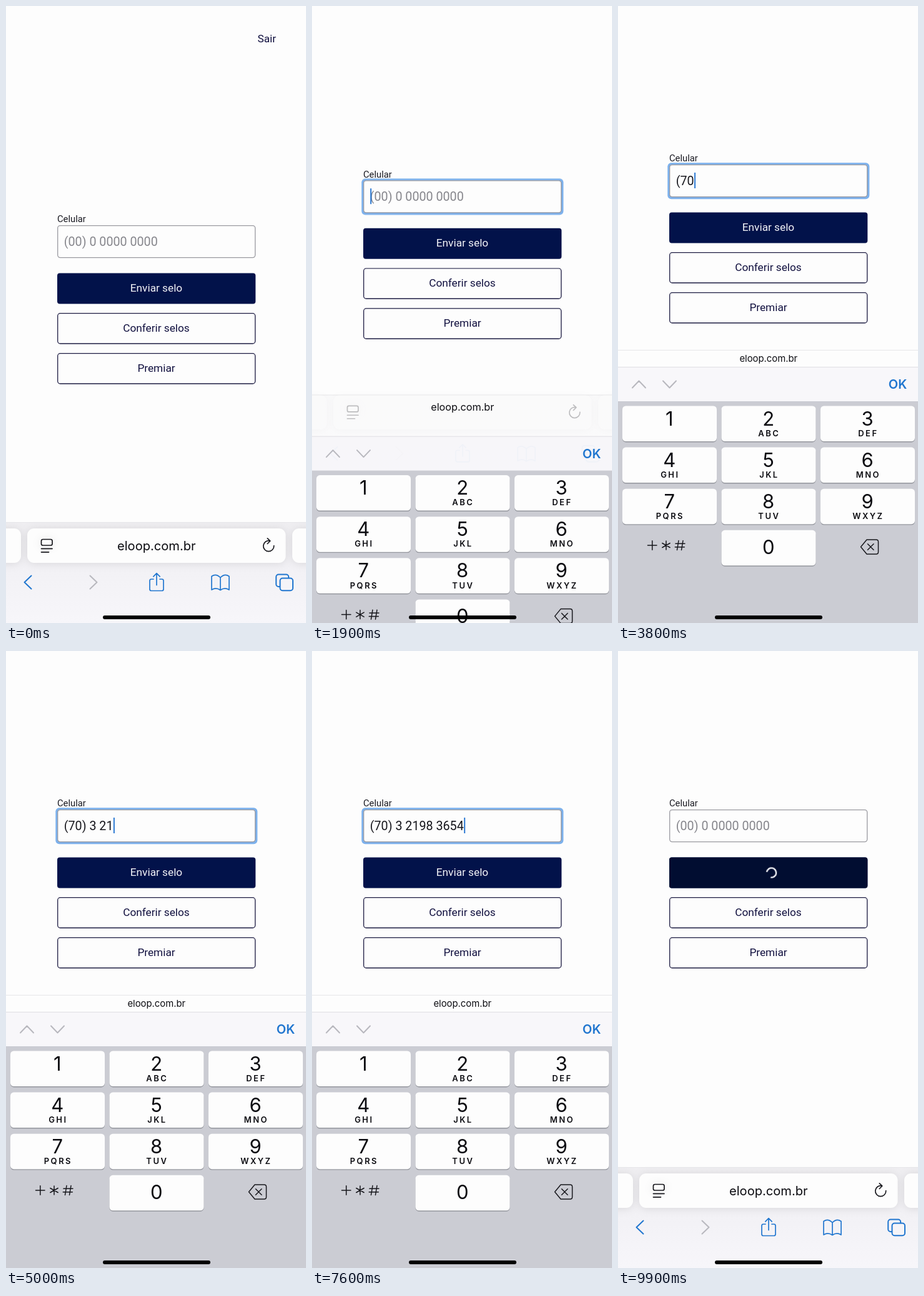
Recreate the animation shown at these times as an HTML page. Size 480 px wide and 985 px high, loop 10000 ms.

```html
<!DOCTYPE html>
<html lang="pt-BR">
<head>
<meta charset="utf-8">
<title>Enviar selo</title>
<style>
  @property --k { syntax: "<number>"; inherits: true; initial-value: 0; } /* keyboard openness */
  @property --s { syntax: "<number>"; inherits: true; initial-value: 0; } /* page scroll */

  html, body { margin: 0; width: 100%; height: 100%; overflow: hidden; background: #fdfdfd; }
  svg {
    display: block; width: 100vw; height: 100vh;
    animation: keyboard 10s infinite, scroll 10s infinite;
    animation-timing-function: cubic-bezier(.38, .7, .125, 1);
  }
  @keyframes keyboard { 0%, 17.5% { --k: 0 } 22.5%, 84.17% { --k: 1 } 89.17%, 100% { --k: 0 } }
  @keyframes scroll { 0%, 17.5% { --s: 0 } 22.5%, 100% { --s: 1 } }

  text { font-family: Inter, sans-serif; fill: #0b0b10; }
  .mid text, text.mid { text-anchor: middle; }
  .line { fill: none; stroke-width: 2; stroke-linecap: round; stroke-linejoin: round; }
  .blue { stroke: #2076cf; }
  .grey { stroke: #b8b8be; }
  .dark { stroke: #17171c; stroke-width: 1.7; }

  #page { transform: translateY(calc(var(--s) * -97px)); }
  #page text { font-family: Roboto, sans-serif; font-size: 17.23px; fill: #11103f; }
  #page .label { font-size: 14.77px; fill: #1a1a22; }
  #page .field { font-size: 19.7px; fill: #16161c; }
  #page #hint { fill: #85858b; }
  #page .light { fill: #f4f4f8; }
  .box { fill: #fdfdfd; stroke: #1d1c42; stroke-width: 1.3; }

  .ring { animation: focus 10s step-end infinite; }
  @keyframes focus { 0% { opacity: 0 } 17.3% { opacity: 1 } 82.5%, 100% { opacity: 0 } }
  .loading { animation: loading 10s step-end infinite; }
  @keyframes loading { 0% { opacity: 0 } 82.5%, 100% { opacity: 1 } }
  .spinner { transform-origin: 245.5px 451px; animation: spin 1s linear infinite; }
  @keyframes spin { from { transform: rotate(-135deg) } to { transform: rotate(225deg) } }

  #panel { transform: translateY(calc(var(--k) * -275px)); }
  #pills { transform: translateY(calc(var(--k) * -288px)); }
  #tools { transform: translateY(calc(var(--k) * -278px)); }
  #panel .tint, #pills, #tools { opacity: calc(1 - var(--k)); }
  #pills rect { fill: #fdfdfd; filter: drop-shadow(0 1px 7px rgba(0, 0, 0, .1)); }
  #url {
    font-size: 20.1px;
    transform: translate(240.8px, calc(869px - var(--k) * 301px)) scale(calc(1 - var(--k) * .262));
  }

  #keyboard { transform: translateY(calc((1 - var(--k)) * 425px)); }
  .key { fill: #fdfdfd; }
  .digit { font-size: 31px; }
  .letters { font-size: 13px; font-weight: 600; letter-spacing: 2.5px; }
</style>
</head>
<body>
<svg viewBox="0 0 480 985" preserveAspectRatio="none">
  <defs>
    <linearGradient id="tint" x2="0" y2="1">
      <stop stop-color="#efeef1"/><stop offset=".45" stop-color="#f2f1f5"/><stop offset="1" stop-color="#f7f6fa"/>
    </linearGradient>
  </defs>
  <rect width="480" height="985" fill="#fdfdfd"/>

  <g id="page">
    <text x="402.5" y="57.5">Sair</text>
    <text class="label" x="82" y="345.3">Celular</text>
    <rect class="ring" x="79.3" y="347.3" width="323" height="58" rx="6" fill="#7db1ec"/>
    <rect class="box" x="82.7" y="350.6" width="316" height="51" rx="4" style="stroke:#9a9aa0"/>
    <text class="field" id="hint" x="92.8" y="383">(00) 0 0000 0000</text>
    <text class="field" id="value" x="92.8" y="383"></text>
    <rect id="caret" y="363" width="2" height="25" fill="#2f7bd3"/>
    <g class="mid">
      <rect x="82" y="426.5" width="317.3" height="49" rx="4" fill="#02124a"/>
      <text class="light" x="240.5" y="456">Enviar selo</text>
      <g class="loading">
        <rect x="82" y="426.5" width="317.3" height="49" rx="4" fill="#010d31"/>
        <circle class="spinner" cx="245.5" cy="451" r="7.6" pathLength="4" stroke-dasharray="3 1"
                fill="none" stroke="#f4f4f8" stroke-width="2.4"/>
      </g>
      <rect class="box" x="82.7" y="490.7" width="316" height="48.3" rx="4"/>
      <text x="240.5" y="520">Conferir selos</text>
      <rect class="box" x="82.7" y="554.7" width="316" height="48.3" rx="4"/>
      <text x="240.5" y="584">Premiar</text>
    </g>
  </g>

  <g id="panel">
    <rect y="824" width="480" height="440" fill="#fdfdfd"/>
    <rect class="tint" y="824" width="480" height="161" fill="url(#tint)"/>
    <path d="M0 824.5H480" stroke="#e6e6e9"/>
  </g>
  <g id="pills">
    <rect x="-40" y="834" width="64" height="55" rx="11"/>
    <rect x="34" y="834" width="413.5" height="55" rx="11"/>
    <rect x="458" y="834" width="64" height="55" rx="11"/>
    <g class="line dark">
      <rect x="56.5" y="851.5" width="17.5" height="9.5" rx="2.5"/>
      <path d="M56.5 866.3H74M56.5 871.8H68.5"/>
      <path d="M422 853.8A8.5 8.5 0 1 0 428.7 861.5M418.3 849.8L422.8 854L418.3 858.5"/>
    </g>
  </g>
  <text id="url" class="mid">eloop.com.br</text>
  <g id="tools" class="line">
    <path class="blue" d="M40.5 909.5L29.5 920L40.5 930.5"/>
    <path class="grey" d="M134.5 909.5L145.5 920L134.5 930.5"/>
    <path class="blue" style="stroke-width:1.7" d="M236 915H232.5Q230 915 230 917.5V931Q230 933.500 232.500 933.500H249.500Q252 933.500 252 931V917.500Q252 915 249.500 915H246M241 924.500V905.800M235.800 910.800L241 905.600L246.200 910.800"/>
    <path class="blue" style="stroke-width:1.7" d="M343 912.5Q336 905.500 329 910.500V932Q336 927.500 343 932.500Q350 927.500 357 932V910.500Q350 905.500 343 912.500V932"/>
    <rect class="blue" x="432.2" y="907.5" width="20" height="19.500" rx="4"/>
    <rect class="blue" x="438.500" y="913.500" width="20.500" height="19.800" rx="4" fill="#f5f4f8"/>
  </g>

  <g id="keyboard">
    <rect y="576" width="480" height="56" fill="#f7f6fa" opacity=".88"/>
    <path d="M0 576.500H480" stroke="#dfdfe3"/>
    <path class="line grey" d="M23 609.500L33.500 598.500L44 609.500M72 598.500L82.500 609.500L93 598.500"/>
    <text class="mid" x="447.500" y="611.300" font-size="20" font-weight="600" style="fill:#2076cf">OK</text>
    <rect y="631" width="480" height="360" fill="#cbccd3"/>
    <g id="keys" class="mid"></g>
    <g class="line dark" style="stroke-width:1.5">
      <path d="M47.500 861H62M54.800 853.800V868.200"/>
      <path d="M77 854V868M70.800 857.500L83.200 864.500M83.200 857.500L70.800 864.500"/>
      <path d="M97 853.500L94.500 868.500M104 853.500L101.500 868.500M92 858.300H107M91.300 863.800H106.300"/>
      <path d="M398 852H413Q416.500 852 416.500 855.500V871.500Q416.500 875 413 875H398L388.500 863.500ZM399.500 858.800L409 868.300M409 858.800L399.500 868.300"/>
    </g>
  </g>
  <rect x="155" y="973" width="172" height="6" rx="3"/>
</svg>

<script>
  const $ = id => document.getElementById(id);
  const LOOP = 10000, FOCUS = 1750, SUBMIT = 8250, PRESS = 110;
  const NUMBER = "70321983654";
  const PRESSES = [2900, 3400, 3950, 4450, 4800, 5250, 5650, 6050, 6400, 6800, 7450];
  const LETTERS = ["", "ABC", "DEF", "GHI", "JKL", "MNO", "PQRS", "TUV", "WXYZ"];

  const keys = {};
  function addKey(digit, col, row, letters = "") {
    const x = 7 + col * 158.5, y = 638.5 + row * 66.1, cx = x + 75.2;
    const group = document.createElementNS("http://www.w3.org/2000/svg", "g");
    group.innerHTML = `
      <rect x="${x}" y="${y + 1.4}" width="151" height="56.5" rx="5.5" fill="#94969d"/>
      <rect class="key" x="${x}" y="${y}" width="151" height="56.5" rx="5.5"/>
      <text class="digit" x="${cx}" y="${y + (digit ? 31 : 38)}">${digit}</text>
      <text class="letters" x="${cx + 1.2}" y="${y + 48.2}">${letters}</text>`;
    $("keys").append(group);
    keys[digit] = group.querySelector(".key");
  }
  LETTERS.forEach((letters, i) => addKey(i + 1, i % 3, Math.floor(i / 3), letters));
  addKey(0, 1, 3);

  function mask(digits) {
    if (!digits) return "";
    const parts = [digits.slice(2, 3), digits.slice(3, 7), digits.slice(7)].filter(Boolean);
    return "(" + digits.slice(0, 2) + (parts.length ? ") " + parts.join(" ") : "");
  }

  function draw(now) {
    const t = now % LOOP;
    const focused = t >= FOCUS && t < SUBMIT;
    const done = PRESSES.filter(p => p <= t);
    const count = focused ? done.length : 0;
    const last = done.length ? done[done.length - 1] : FOCUS;

    $("value").textContent = mask(NUMBER.slice(0, count));
    $("hint").style.display = count ? "none" : "";
    $("caret").setAttribute("x", 93.2 + (count ? $("value").getComputedTextLength() : 0));
    $("caret").style.display = focused && (t - last) % 1000 < 550 ? "" : "none";

    const pressed = count && t - last < PRESS ? NUMBER[count - 1] : null;
    for (const digit in keys) keys[digit].style.fill = digit === pressed ? "#b3b5bd" : "";
    requestAnimationFrame(() => draw(performance.now()));
  }
  draw(performance.now());
</script>
</body>
</html>
```
